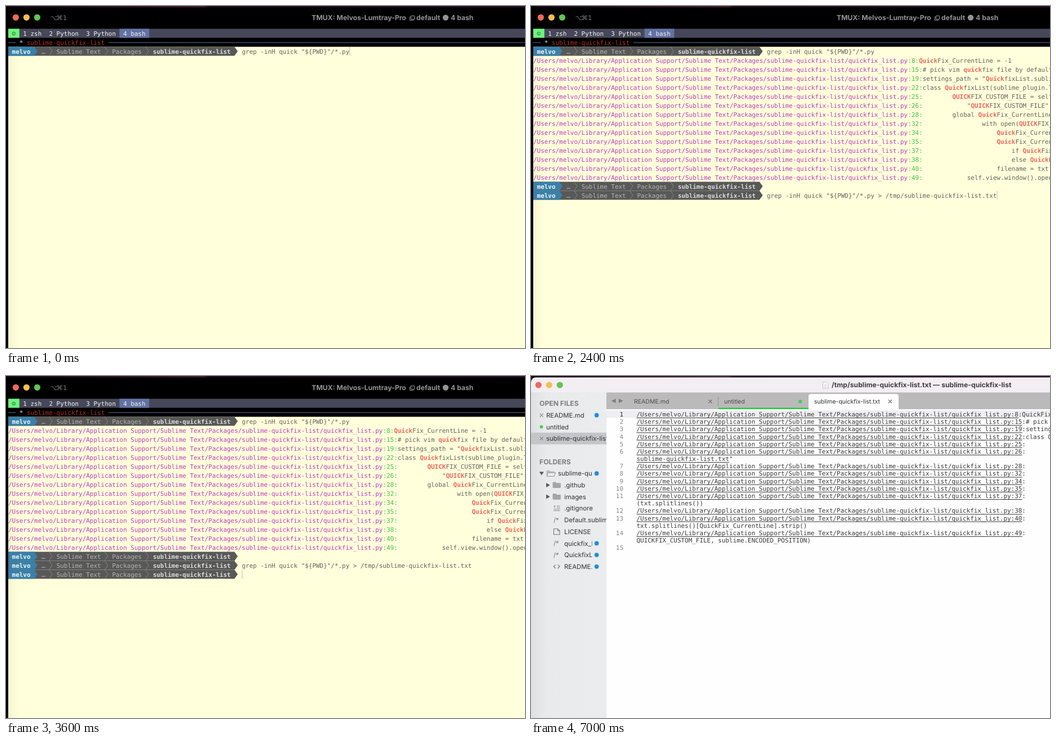
Recreate the animation shown at these times as an HTML page. Size 922 px wide and 608 px high, loop 8 s.

```html
<!DOCTYPE html>
<html lang="en">
<head>
<meta charset="utf-8">
<title>Quickfix list demo</title>
<style>
  html, body { margin: 0; width: 100%; height: 100%; overflow: hidden; background: #000; }
  svg { display: block; width: 922px; height: 608px; }
  text { white-space: pre; text-rendering: geometricPrecision; }
  .mono { font: 10.943px "DejaVu Sans Mono", monospace; }
  .ui { font: 11.4px Inter, sans-serif; }
  .bold { font-weight: 700; }
</style>
</head>
<body>
<svg id="stage" viewBox="0 0 922 608" xmlns="http://www.w3.org/2000/svg">
  <defs>
    <linearGradient id="desk">
      <stop offset="0" stop-color="#160a17"/><stop offset=".38" stop-color="#42202f"/>
      <stop offset=".39" stop-color="#1d0b20"/><stop offset="1" stop-color="#2a0f2c"/>
    </linearGradient>
    <linearGradient id="paper">
      <stop offset="0" stop-color="#f6f6d2"/><stop offset="1" stop-color="#ffffdb"/>
    </linearGradient>
    <linearGradient id="side">
      <stop offset="0" stop-color="#dee0e3"/><stop offset=".2" stop-color="#e8eaec"/><stop offset="1" stop-color="#eaecee"/>
    </linearGradient>
    <clipPath id="wide"><rect width="134" height="608"/></clipPath>
    <clipPath id="narrow"><rect width="108.5" height="608"/></clipPath>
  </defs>
</svg>
<script>
const LOOP = 8000, CW = 6.588, LEFT = 4, ROW = 16;
const stage = document.getElementById('stage');

function el(parent, name, attrs, content) {
  const node = document.createElementNS('http://www.w3.org/2000/svg', name);
  for (const key in attrs) node.setAttribute(key, attrs[key]);
  if (content !== undefined) node.textContent = content;
  return parent.appendChild(node);
}
const group = (parent, attrs = {}) => el(parent, 'g', attrs);
const rect = (p, x, y, width, height, fill, more) => el(p, 'rect', { x, y, width, height, fill, ...more });
const dot = (p, cx, cy, r, fill) => el(p, 'circle', { cx, cy, r, fill });
const path = (p, d, fill, stroke = 'none', width = 1) =>
  el(p, 'path', { d, fill, stroke, 'stroke-width': width });
const mono = (p, x, y, text, fill, bold) =>
  el(p, 'text', { x, y, fill, class: bold ? 'mono bold' : 'mono' }, text);
const ui = (p, x, y, text, fill, size = 11.4, bold = false, more = {}) =>
  el(p, 'text', { x, y, fill, class: bold ? 'ui bold' : 'ui', style: `font-size:${size}px`, ...more }, text);
const cross = (p, x, y, color) =>
  path(p, `M${x - 3} ${y - 3}l6 6m0 -6l-6 6`, 'none', color, 1.3);
const lights = (p, x, y) =>
  ['#ed6a5e', '#f5bf4f', '#61c554'].forEach((c, i) => dot(p, x + 19 * i, y, 5.6, c));

const FILE = '/Users/melvo/Library/Application Support/Sublime Text/Packages/sublime-quickfix-list/quickfix_list.py';
const GREP = 'grep -inH quick "${PWD}"/*.py';
const PROJECT = 'sublime-quickfix-list';
const hits = [
  [8, 0, 'QuickFix_CurrentLine = -1'],
  [15, 0, '# pick vim quickfix file by default'],
  [19, 0, 'settings_path = "QuickfixList.sublime'],
  [22, 0, 'class QuickfixList(sublime_plugin.Text'],
  [25, 8, 'QUICKFIX_CUSTOM_FILE = self.'],
  [26, 12, '"QUICKFIX_CUSTOM_FILE", '],
  [28, 8, 'global QuickFix_CurrentLine'],
  [32, 16, 'with open(QUICKFIX_CUSTOM'],
  [34, 20, 'QuickFix_CurrentLine'],
  [35, 20, 'QuickFix_CurrentLine'],
  [37, 24, 'if QuickFix_Current'],
  [38, 24, 'else QuickFix_Current'],
  [40, 20, 'filename = txt.split'],
  [49, 12, 'self.view.window().open_file'],
];

// ---- Terminal ----
const col = n => LEFT + n * CW;
const base = row => 85 + ROW * row;

function prompt(p, row, command = '') {
  const top = 73 + ROW * row - .5, mid = top + 8, y = base(row);
  const arrow = (n, fill) => path(p, `M${LEFT} ${top}H${col(n)}L${col(n + 1) - .8} ${mid}L${col(n)} ${top + ROW}H${LEFT}Z`, fill);
  arrow(61, '#585858');
  arrow(7, '#3a80a8');
  for (const n of [11, 26, 37])
    path(p, `M${col(n)} ${top}l5.6 8l-5.6 8`, 'none', '#8c8c8c', .9);
  mono(p, col(1), y, 'melvo', '#f2f6f8', true);
  mono(p, col(9), y, '…', '#bcbcbc');
  mono(p, col(13), y, 'Sublime Text', '#b4b4b4');
  mono(p, col(28), y, 'Packages', '#b4b4b4');
  mono(p, col(39), y, PROJECT, '#dadada', true);
  mono(p, col(63), y, command, '#626260');
}

function hitLine(p, row, [num, indent, code]) {
  const y = base(row);
  let n = FILE.length;
  mono(p, col(0), y, FILE, '#bd3bbd');
  const tag = `:${num}:`;
  mono(p, col(n), y, tag, '#3fc049');
  n += tag.length + indent;
  for (const part of code.split(/(quick)/i)) {
    const match = /^quick$/i.test(part);
    // Runs start on their first visible character.
    const gap = part.length - part.trimStart().length;
    if (part) mono(p, col(n + gap), y, part.trim(), match ? '#f4645b' : '#626260', match);
    n += part.length;
  }
}

function terminal() {
  const g = group(stage);
  rect(g, 0, 0, 922, 608, '#000');
  rect(g, 0, 0, 922, 2.5, 'url(#desk)');
  lights(g, 17.4, 20.3);
  [['⌥', 78.5], ['⌘', 89.5], ['1', 101]].forEach(([s, x]) =>
    el(g, 'text', { x, y: 24.5, fill: '#777', style: 'font:11.5px "DejaVu Sans",sans-serif' }, s));
  const gray = '#939393';
  ui(g, 543, 24.8, 'TMUX: Melvos-Lumtray-Pro', gray, 12.2, true);
  path(g, 'M719.5 17.5h6v6h-6zM719.5 19.5h-2v6h6v-2', 'none', gray);
  ui(g, 729, 24.8, 'default', gray, 12.2, true);
  dot(g, 781, 20.6, 5.2, gray);
  ui(g, 790, 24.8, '4 bash', gray, 12.2, true);

  rect(g, LEFT, 40.5, 918, 16, '#464859');
  rect(g, LEFT, 40.5, CW * 3, 16, '#6cf47c');
  rect(g, col(30), 40.5, CW * 8, 16, '#6272a4');
  mono(g, col(1), 52.6, '☺', '#244a2c');
  [[4, '1 zsh'], [11, '2 Python'], [21, '3 Python'], [31, '4 bash']].forEach(([n, s]) =>
    mono(g, col(n), 52.6, s, '#f4f4f0'));

  path(g, `M${LEFT} 65H${col(2)}M${col(27)} 65H922`, 'none', '#6272a4', 1.2);
  mono(g, col(3), 69, '*', '#e8e8e8');
  mono(g, col(5), 69, PROJECT, '#b7301f');

  rect(g, LEFT, 72.5, 918, 536, '#ffffdb');
  rect(g, LEFT, 72.5, 20, 536, 'url(#paper)');
  prompt(g, 0, GREP);

  const output = group(g);
  hits.forEach((hit, i) => hitLine(output, i + 1, hit));
  prompt(output, 15);
  const saved = group(g);
  prompt(saved, 16, GREP + ' > /tmp/sublime-quickfix-list.txt');
  const last = group(g);
  prompt(last, 17);
  const caret = rect(g, 0, 0, 1, 15.5, '#c3c3ae');
  return { g, output, saved, last, caret };
}

// ---- Editor ----
const INK = '#303234', ICON = '#8b8d90', BLUE = '#2290d2', GREEN = '#45cb52';

function folder(p, x, y, open) {
  path(p, `M${x} ${y - 4}q0 -1.5 1.5 -1.5h4l1.5 1.8h6q1.4 0 1.4 1.4v6q0 1.5 -1.5 1.5h-11.4q-1.5 0 -1.5 -1.5z`, open ? '#b9bbbd' : '#a3a5a7');
  if (open) path(p, `M${x + .5} ${y + 5}l2.3 -6.2h13.2l-2.2 6.2z`, '#eceef0', ICON, 1);
}

function sidebar(p, second) {
  const at = k => 49 + 20.7 * (k + (second && k > 3 ? 1 : 0));
  rect(p, 0, 29, 134, 579, 'url(#side)');
  if (second) rect(p, 0, 100.7, 134, 20.8, '#c4c5c8');
  else rect(p, 0, 80, 134, 20.8, '#c6c9cf');
  const label = (x, y, s, dirty) => {
    ui(p, x, y + 4.1, s, INK, 11.4, false, { 'clip-path': `url(#${dirty ? 'narrow' : 'wide'})` });
    if (dirty) dot(p, 116.6, y, 3.9, BLUE);
  };
  const heading = (k, s) => ui(p, 15, at(k) + 4.3, s, '#7c7e81', 12.2, true);

  heading(0, 'OPEN FILES');
  cross(p, 18.7, at(1), '#929497');
  label(27, at(1), 'README.md', true);
  dot(p, 18.5, at(2), 2.9, GREEN);
  label(27, at(2), 'untitled');
  if (second) {
    cross(p, 18.7, 111.1, '#87898c');
    label(27, 111.1, PROJECT + '.txt');
  }
  heading(4, 'FOLDERS');
  path(p, `M14.8 ${at(5) - 3}h8l-4 6.4z`, '#56585b');
  folder(p, 27.5, at(5), true);
  label(48, at(5), PROJECT, true);
  ['.github', 'images'].forEach((s, i) => {
    const y = at(6 + i);
    path(p, `M27 ${y - 4}l6.6 4l-6.6 4z`, '#56585b');
    folder(p, 38.5, y);
    label(59, y, s);
  });

  let y = at(8);
  path(p, `M40 ${y - 4}h4m2 0h5.5M46 ${y - 1.3}h5.5M42 ${y - 4}v3M40 ${y + 1.5}h11.5M40 ${y + 4.2}h11.5`, 'none', ICON, 1.1);
  label(59, y, '.gitignore');
  y = at(10);
  path(p, `M40.5 ${y - 5}h7l3.5 3.5v6.5h-10.5zM47.5 ${y - 5}v3.5h3.5`, 'none', '#737578', 1.1);
  label(59, y, 'LICENSE');
  [[9, 'Default.sublime-commands'], [11, 'quickfix_list.py', true], [12, 'QuickfixList.sublime-settings', true]]
    .forEach(([k, s, dirty]) => {
      ui(p, 40, at(k) + 3.8, '/*', '#6c6e71', 11);
      label(59, at(k), s, dirty);
    });
  y = at(13);
  path(p, `M43.6 ${y - 3.2}l-3.3 3.2l3.3 3.2M47.6 ${y - 3.2}l3.3 3.2l-3.3 3.2`, 'none', '#6c6e71', 1.1);
  label(59, y, 'README.md', true);
}

function tabs(p, second) {
  rect(p, 134, 29.5, 788, 29.5, '#bababa');
  path(p, 'M150.5 40.3v8l-7.5 -4zM156 40.3v8l7.5 -4z', '#7d7d7d');
  ui(p, 183, 48.8, 'README.md', '#4c4c4c', 10.5);
  cross(p, 318.5, 45.3, '#727272');
  const x = second ? 493 : 333;
  path(p, `M${x} 59V36q0 -4 4 -4h152q4 0 4 4v23z`, '#fefefe');
  if (second) {
    rect(p, 332, 37, 1, 17, '#8f8f8f');
    rect(p, 333, 56.4, 160, 2.6, '#32c84a');
    ui(p, 503, 48.8, PROJECT + '.txt', INK, 10.5);
    cross(p, 638, 45.3, '#727272');
  } else {
    path(p, 'M333 35.2q0 -3.2 3.5 -3.2h153q3.5 0 3.5 3.2z', '#21c33b');
  }
  ui(p, 343, 48.8, 'untitled', second ? '#4c4c4c' : INK, 10.5);
  dot(p, 478.3, 45.4, 3.1, GREEN);
}

function lineNumber(p, n, y) {
  el(p, 'text', { x: 164, y, class: 'mono', 'text-anchor': 'end', fill: n === 1 ? '#222' : '#85878a' }, n);
}

function palette(p) {
  rect(p, 471, 59, 451, 83, '#000', { opacity: .05 });
  rect(p, 472.5, 59, 450, 81, '#e9eaec');
  rect(p, 476, 63, 446, 24, '#fff');
  rect(p, 476, 114, 446, 23.5, '#c7c9d0');
  ui(p, 482, 79.2, 'quickfix list', '#242424', 11.9);
  rect(p, 545.5, 67.5, 1.2, 14.5, '#111');
  [[106.3, 'Next match'], [130, 'Open quickfix list file']].forEach(([y, s]) => {
    ui(p, 482, y, 'Quickfix List', '#000', 12.2, true);
    ui(p, 558, y, ': ' + s, '#55575b', 12.05);
  });
}

function listing(p) {
  const wraps = {
    6: 'sublime-quickfix-list.txt"',
    11: '(txt.splitlines())',
    13: 'txt.splitlines()[QuickFix_CurrentLine].strip()',
    14: 'QUICKFIX_CUSTOM_FILE, sublime.ENCODED_POSITION)',
  };
  const x = 187.5;
  let y = 72;
  hits.forEach(([num, indent, code], i) => {
    const n = i + 1, link = `${FILE}:${num}`;
    lineNumber(p, n, y);
    mono(p, x, y, link + ':' + (indent ? '' : code), '#3a3a3a');
    rect(p, x, y + 2, link.length * CW, 1, '#333');
    y += 13.18;
    if (wraps[n]) {
      mono(p, x, y, wraps[n], '#3a3a3a');
      if (n === 6) rect(p, x, y + 2, 25 * CW, 1, '#333');
      y += 13.18;
    }
  });
  lineNumber(p, 15, y);
}

function editor(second) {
  const g = group(stage);
  rect(g, 0, 0, 922, 608, '#fefefe');
  rect(g, 0, 0, 922, 14, 'url(#desk)');
  path(g, 'M0 30V12q0 -9.5 9.5 -9.5H922V30z', '#f3eef2');
  rect(g, 0, 29, 922, .8, '#d9d5d8');
  lights(g, 13.2, 16);
  if (second) {
    path(g, 'M518.5 10.5h6l3.5 3.5v8h-9.5z', '#fafafa', '#c3c0c2');
    path(g, 'M520.5 15h5m-5 2.3h5m-5 2.3h5', 'none', '#bbb', .7);
    ui(g, 534, 20.2, '/tmp/sublime-quickfix-list.txt — ' + PROJECT, '#413d40', 12.2, true);
  } else {
    dot(g, 13.2, 16, 2, '#7c1710');
    ui(g, 592, 20.2, 'untitled — ' + PROJECT, '#413d40', 12.2, true);
  }
  sidebar(g, second);
  tabs(g, second);
  rect(g, 134, 61, 788, 13.3, second ? '#efeff1' : '#f2f1f3');
  if (second) listing(g);
  else {
    lineNumber(g, 1, 72);
    palette(g);
  }
  return g;
}

// ---- Timeline ----
const term = terminal(), search = editor(false), results = editor(true);
// start ms, step, caret column, caret row
const steps = [
  [0, 0, 92, 0], [1200, 1, 63, 15], [2400, 2, 125, 16],
  [3600, 3, 63, 17], [4800, 4], [7000, 5],
];
const show = (node, on) => node.setAttribute('display', on ? 'inline' : 'none');

function draw(t) {
  const [, step, c = 0, row = 0] = steps.filter(s => s[0] <= t).pop();
  show(term.g, step < 4);
  show(term.output, step >= 1);
  show(term.saved, step >= 2);
  show(term.last, step >= 3);
  show(search, step === 4);
  show(results, step === 5);
  term.caret.setAttribute('x', col(c));
  term.caret.setAttribute('y', 73 + ROW * row);
}

const begin = performance.now();
function tick() {
  draw((performance.now() - begin) % LOOP);
  requestAnimationFrame(tick);
}
tick();
</script>
</body>
</html>
```
